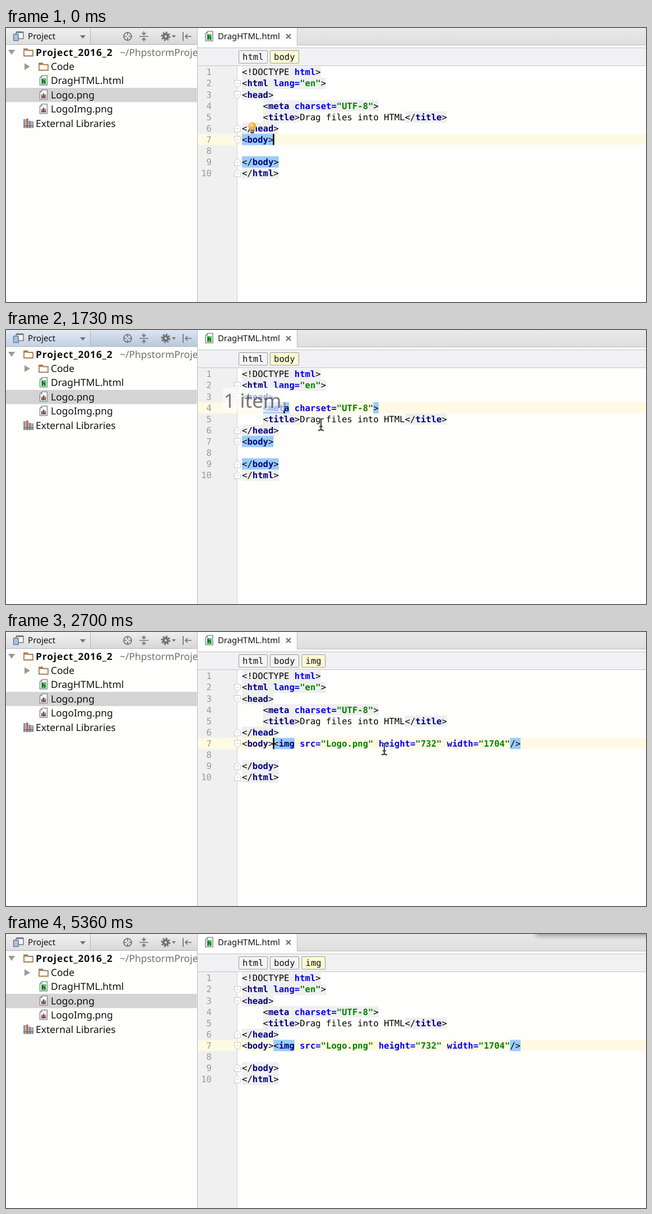
An HTML page for the animation above (5430 ms loop, 1142 px wide and 490 px high).

```html
<!DOCTYPE html>
<html lang="en">
<head>
<meta charset="UTF-8">
<title>Drag files into HTML</title>
<style>
html, body { margin: 0; width: 100%; height: 100%; overflow: hidden; background: #fefefd; }
svg { display: block; text-rendering: geometricPrecision; }
text { white-space: pre; fill: #111; }
.ui { font: 17.45px "Noto Sans", "Open Sans", sans-serif; }
.bar { font-size: 15.1px; }
.tab { font-size: 14.85px; }
.strong { font-weight: 700; letter-spacing: .85px; }
.item { font-size: 34.9px; fill: #000; fill-opacity: .52; }
.mono { font: 15.58px "DejaVu Sans Mono", monospace; }
.p { fill: #000; }
.k { fill: #000080; font-weight: 700; }
.a { fill: #0000f4; font-weight: 700; }
.v { fill: #008000; font-weight: 700; }
.num { fill: #999; text-anchor: end; }
.crumb rect { fill: #f5f5f5; stroke: #999; }
.crumb.on rect { fill: #fefbd2; }
.tool { fill: none; stroke: #737373; stroke-width: 1.7; }
.solid { fill: #737373; }
</style>
</head>
<body>
<svg width="1142" height="490" viewBox="0 0 1142 490">
  <defs>
    <linearGradient id="grey" x2="0" y2="1"><stop stop-color="#ededed"/><stop offset="1" stop-color="#d8d8d8"/></linearGradient>
    <linearGradient id="blue" x2="0" y2="1"><stop stop-color="#dde6f1"/><stop offset="1" stop-color="#b8c8df"/></linearGradient>
    <linearGradient id="tabs" x2="0" y2="1"><stop stop-color="#e9e9e9"/><stop offset="1" stop-color="#dedede"/></linearGradient>
    <filter id="blur" x="-20%" y="-100%" width="140%" height="300%"><feGaussianBlur stdDeviation="5"/></filter>
    <clipPath id="side"><path d="M0 30H341V490H0Z"/></clipPath>
    <g id="folder"><path d="M1 2.5H7L9 5H17V15H1Z" fill="#fffdf8" stroke="#a77e50" stroke-width="1.8"/><path d="M1 3H7L8.5 5.5H1Z" fill="#a77e50"/></g>
    <g id="page"><path d="M5 1H14V18H1V5Z" fill="#fafafa" stroke="#8b9297" stroke-width="1.6"/><path d="M1 5H5V1Z" fill="#8b9297"/></g>
    <g id="htmlFile"><use href="#page"/><path d="M3.5 6H12V16.500H3.500Z" fill="#4fc45b"/><path d="M5.700 7V15.500M5.700 11.500Q9.800 9 9.800 12.500V15.500" fill="none" stroke="#174e20" stroke-width="1.600"/></g>
    <g id="imageFile"><use href="#page"/><path d="M3.500 10H6V16H3.500Z" fill="#c8483c"/><path d="M6.300 7.500H8.800V16H6.300Z" fill="#555"/><path d="M9.200 9.500H11.700V16H9.200Z" fill="#b5652f"/><path d="M3.500 13H11.700V16H3.500Z" fill="#384b80" opacity=".45"/></g>
    <path id="foldDown" d="M-5.500 -6H5.500V2L0 7L-5.500 2Z"/>
    <path id="foldUp" d="M-5.500 6H5.500V-2L0 -7L-5.500 -2Z"/>
    <path id="beam" d="M-5 -10.500Q-1 -10.500 0 -8.500Q1 -10.500 5 -10.500M0 -8.500V8.500M-5 10.500Q-1 10.500 0 8.500Q1 10.500 5 10.500M-3 3.500H3"/>
  </defs>

  <path d="M0 0H1142V490H0Z" fill="#fefefd"/>

  <!-- editor -->
  <path d="M342 0H1142V30H342Z" fill="url(#tabs)"/>
  <path d="M519.500 30.500H1142M519.500 0V31" stroke="#bdbdbd"/>
  <path d="M342 0H519V35H342Z" fill="#fefefe"/>
  <path d="M342 36H1142V67H342Z" fill="#f1f1f3"/>
  <path d="M342 35.500H1142M342 67.500H1142" stroke="#c6c6c6"/>
  <use href="#htmlFile" x="355" y="5"/>
  <text class="ui tab" x="378" y="20">DragHTML.html</text>
  <path d="M500 11L508 19M508 11L500 19" stroke="#6a6a6a" stroke-width="2"/>
  <path d="M342 68H412V490H342Z" fill="#f0f0f1"/>
  <g id="shade" fill="#efefef"></g>
  <rect id="row" x="342" width="800" height="20" fill="#fffae3"/>
  <path d="M412.500 68V490" stroke="#d2d2d2"/>
  <g id="marks" fill="#9accfa"></g>
  <g id="folds" fill="#fefefe" stroke="#c6c6c6"></g>
  <g id="code"></g>
  <g id="crumbs"></g>
  <rect id="caret" width="2.400" height="20"/>
  <g id="bulb">
    <circle cx="439.500" cy="175.500" r="7" fill="#f3b04f"/>
    <circle cx="438" cy="173.500" r="3.300" fill="#fbd48c"/>
    <path d="M436 182H443V187L441 189H438L436 187Z" fill="#686868"/>
    <path d="M436 184.500H443" stroke="#bbb"/>
  </g>

  <!-- project panel -->
  <rect id="head" width="341" height="29"/>
  <path d="M0 0H150V29H0Z" fill="#fff" opacity=".18"/>
  <path d="M0 29.500H341M150.500 0V29" stroke="#b4b4b4"/>
  <path d="M341.500 0V490" stroke="#bcbcbc"/>
  <path d="M18 8H31V19H18Z" fill="#f6f6f6" stroke="#7b7b7b" stroke-width="1.500"/>
  <path d="M18 7.500H31" stroke="#7b7b7b" stroke-width="3"/>
  <path d="M13.500 11H22V22.500H13.500Z" fill="#a9c3df" stroke="#5f7f9f" stroke-width="1.500"/>
  <text class="ui bar" x="39" y="20">Project</text>
  <path class="solid" d="M132 13H142L137 19ZM296 13H303L299.500 17.500Z"/>
  <g class="tool">
    <circle cx="217" cy="15" r="7"/>
    <path d="M217 7V13M217 17V23M209 15H215M219 15H225"/>
    <path d="M238 15H254M246 6V11M246 24V19M242.500 8.500L246 12L249.500 8.500M242.500 21.500L246 18L249.500 21.500"/>
    <circle cx="285" cy="15" r="4" stroke-width="4"/>
    <circle cx="285" cy="15" r="7" stroke-width="3" stroke-dasharray="2.750"/>
    <path d="M316 7V23M320 15H331M324 11L320 15L324 19"/>
  </g>
  <path d="M0 107H340.500V132.500H0Z" fill="#d4d4d4"/>
  <path d="M4 39H16L10 48ZM33 63L43 69L33 75Z" fill="#9a9a9a"/>
  <use href="#folder" x="31" y="35"/>
  <use href="#folder" x="58" y="60.500"/>
  <use href="#htmlFile" x="59.500" y="84"/>
  <use href="#imageFile" x="59.500" y="109.500"/>
  <use href="#imageFile" x="59.500" y="135"/>
  <g stroke-width="4">
    <path d="M33 163V179" stroke="#8d9aa5"/><path d="M37.800 162V179" stroke="#c0694e"/>
    <path d="M42.600 166V179" stroke="#7288a8"/><path d="M47.300 167V179" stroke="#9aa3aa"/>
    <path d="M31 175H49.500" stroke="#66727d" stroke-width="1.500"/>
  </g>
  <g class="ui" clip-path="url(#side)">
    <text class="strong" x="53" y="49.500">Project_2016_2</text>
    <text x="203" y="49.500" style="fill:#707070">~/PhpstormProjects</text>
    <text x="80" y="75">Code</text>
    <text x="80" y="100">DragHTML.html</text>
    <text x="80" y="125.500">Logo.png</text>
    <text x="80" y="151">LogoImg.png</text>
    <text x="53" y="176.500">External Libraries</text>
  </g>

  <g id="label">
    <rect x="-109" y="-45" width="110" height="44" rx="5" fill="#fefefe" fill-opacity=".66"/>
    <text class="ui item" x="-107.500" y="-9.500">1 item</text>
  </g>
  <path id="arrow" d="M0 0V18.500L4.300 14.700L7.500 22L10.800 20.500L7.700 13.500H13Z" fill="#111" stroke="#fff" stroke-width="1.200"/>
  <g id="ibeam" fill="none">
    <use href="#beam" stroke="#fff" stroke-opacity=".75" stroke-width="4"/>
    <use href="#beam" stroke="#3c3c3c" stroke-width="2"/>
  </g>
  <rect id="shadow" x="945" y="-30" width="240" height="33" fill="#000" filter="url(#blur)"/>
</svg>
<script>
const LOOP = 5430, CELL = 9.38, PITCH = 20.07, LEFT = 421, TOP = 68.9;
const $ = id => document.getElementById(id);
const colX = col => LEFT + col * CELL;
const rowY = row => TOP + (row - 1) * PITCH;

function add(parent, tag, attrs, text) {
  const node = document.createElementNS('http://www.w3.org/2000/svg', tag);
  for (const name in attrs) node.setAttribute(name, attrs[name]);
  if (text) node.textContent = text;
  return parent.appendChild(node);
}
const show = (node, on) => node.setAttribute('visibility', on ? 'visible' : 'hidden');
const move = (node, [x, y]) => node.setAttribute('transform', `translate(${x} ${y})`);
const band = (parent, row, col, len) => add(parent, 'rect',
  { x: colX(col), y: rowY(row), width: len * CELL, height: PITCH + .1 });

// The first letter of each token is its style.
function write(parent, row, col, tokens) {
  for (const token of tokens) {
    add(parent, 'text', { class: 'mono ' + token[0], x: colX(col), y: rowY(row) + 15.5 }, token.slice(1));
    col += token.length - 1;
  }
  return col;
}

const lines = [
  ['p<!DOCTYPE ', 'ahtml', 'p>'],
  ['p<', 'khtml ', 'alang=', 'v"en"', 'p>'],
  ['p<', 'khead', 'p>'],
  ['p    <', 'kmeta ', 'acharset=', 'v"UTF-8"', 'p>'],
  ['p    <', 'ktitle', 'p>Drag files into HTML</', 'ktitle', 'p>'],
  ['p</', 'khead', 'p>'],
  ['p<', 'kbody', 'p>'],
  [],
  ['p</', 'kbody', 'p>'],
  ['p</', 'khtml', 'p>']
];
const ends = lines.map((tokens, i) => {
  add($('code'), 'text', { class: 'mono num', x: 367, y: rowY(i + 1) + 15.5 }, i + 1);
  return write($('code'), i + 1, 0, tokens);
});
const inserted = add($('code'), 'g', {});
write(inserted, 7, 6, ['p<', 'kimg ', 'asrc=', 'v"Logo.png" ', 'aheight=', 'v"732" ', 'awidth=', 'v"1704"', 'p/>']);

ends.forEach((end, i) => {
  const row = i + 1;
  if (row === 5) { band($('shade'), 5, 4, 7); band($('shade'), 5, 31, 8); }
  else band($('shade'), row, row === 4 ? 4 : 0, end - (row === 4 ? 4 : 0));
});

const group = () => add($('marks'), 'g', {});
const bodyMark = group(), metaMark = group(), imgMark = group(), closeMark = group();
band(bodyMark, 7, 0, 6); band(bodyMark, 9, 0, 7);
band(metaMark, 4, 4, 5); band(metaMark, 4, 25, 1);
band(imgMark, 7, 6, 4);
band(closeMark, 7, 51, 2);

function fold(row, shape) {
  const g = add($('folds'), 'g', { transform: `translate(413 ${rowY(row) + 10.5})` });
  add(g, 'use', { href: shape });
  add(g, 'path', { d: 'M-2.500 0H2.500' });
}
[2, 3, 7].forEach(row => fold(row, '#foldDown'));
[6, 9, 10].forEach(row => fold(row, '#foldUp'));

const crumbs = [['html', 415.5], ['body', 471.5], ['img', 528]].map(([name, x]) => {
  const g = add($('crumbs'), 'g', { class: 'crumb' });
  add(g, 'rect', { x, y: 40.5, width: name.length * CELL + 13.5, height: 22.5, rx: 1.5 });
  add(g, 'text', { class: 'mono', x: x + 6.5, y: 57 }, name);
  return g;
});

// Pointer path: tick, x, y (30 ticks a second).
const path = [
  [8, 616, 451], [10, 480, 330], [12, 320, 220], [14, 200, 145], [15, 176, 128], [19, 176, 128],
  [22, 100, 120], [24, 71, 118], [28, 72, 118], [32, 79, 118], [42, 79, 118], [44, 110, 119],
  [46, 180, 121], [48, 290, 126], [50, 425, 138], [51, 494, 148], [52, 562, 169], [53, 605, 182],
  [54, 636, 192], [56, 668, 203], [58, 679, 206], [60, 679, 206], [70, 675, 209], [102, 675, 209],
  [103, 735, 150], [104, 825, 38]
];
function pointer(n) {
  const i = path.findIndex(key => key[0] >= n);
  if (i < 1) return path[i < 0 ? path.length - 1 : 0].slice(1);
  const [n0, x0, y0] = path[i - 1], [n1, x1, y1] = path[i];
  const f = (n - n0) / (n1 - n0);
  return [x0 + (x1 - x0) * f, y0 + (y1 - y0) * f];
}

const blinks = [8, 23, 38, 58, 97, 112, 127, 142, 157];

function draw(ms) {
  const n = Math.floor((ms + 7) * .03);
  const dragging = n >= 42 && n < 58;
  const here = pointer(n), late = pointer(n - 1);

  // The drop caret trails the pointer by one tick.
  const dropping = dragging && late[0] > 413;
  let row = 7, col = 6;
  if (dropping) {
    row = Math.min(10, Math.floor((late[1] - TOP) / PITCH) + 1);
    col = Math.min(ends[row - 1], Math.round((late[0] - LEFT) / CELL));
  }
  const lit = blinks.filter(tick => tick <= n).length % 2 === 0;
  show($('caret'), dropping || lit);
  $('caret').setAttribute('x', colX(col) - 1);
  $('caret').setAttribute('y', rowY(row));
  $('row').setAttribute('y', rowY(row));

  show($('bulb'), n < 42);
  show(bodyMark, n < 81);
  show(metaMark, dropping && row === 4);
  show(imgMark, n >= 81);
  show(closeMark, n >= 70);
  show(inserted, n >= 70);
  show(crumbs[2], n >= 77);
  crumbs[1].classList.toggle('on', n < 77);
  crumbs[2].classList.add('on');
  $('head').setAttribute('fill', dragging ? 'url(#blue)' : 'url(#grey)');

  show($('label'), n >= 43 && n < 70);
  move($('label'), [late[0] + 2, late[1]]);
  $('label').setAttribute('opacity', Math.min(1, Math.max(0, (70 - n) / 11)));

  const visible = n >= 8 && n < 105, inEditor = here[0] > 413;
  show($('arrow'), visible && !inEditor);
  show($('ibeam'), visible && inEditor);
  move($('arrow'), here);
  move($('ibeam'), here);

  $('shadow').setAttribute('opacity', n >= 161 ? .36 : n >= 128 ? .18 : 0);
}

function tick() {
  draw(performance.now() % LOOP);
  requestAnimationFrame(tick);
}
tick();
</script>
</body>
</html>
```
